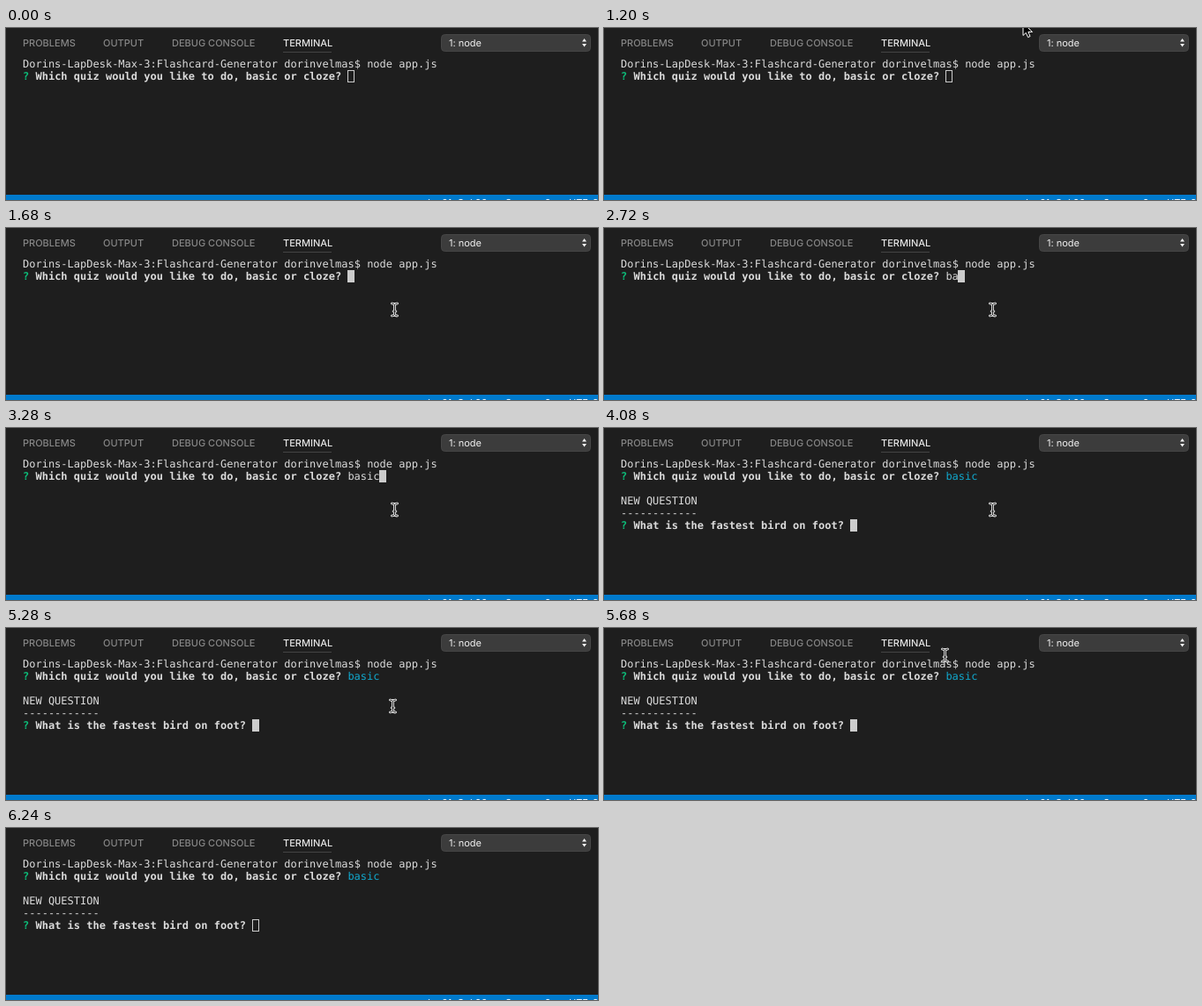
Animation of 671 by 196 pixels, one loop 6320 ms. Source, as an HTML page:

```html
<!DOCTYPE html>
<html lang="en">
<head>
<meta charset="utf-8">
<title>Terminal quiz</title>
<style>
  html, body { margin: 0; width: 100%; height: 100%; overflow: hidden; background: #1e1e1e; }
  svg { display: block; }
  text { white-space: pre; text-rendering: geometricPrecision; }
  .ui { font: 500 11px Inter, sans-serif; fill: #868686; }
  .ui .active { fill: #e7e7e7; }
  .ui .option { font-weight: 400; fill: #f0f0f0; }
  .ui .status { font-weight: 400; fill: #fff; }
  .term { font: 12px "DejaVu Sans Mono", monospace; fill: #dcdcdc; }
  .bold { font-weight: 700; }
  .green { fill: #0dbc79; }
  .cyan { fill: #11a8cd; }
</style>
</head>
<body>
<svg width="671" height="196" viewBox="0 0 671 196">
  <rect width="671" height="196" fill="#1e1e1e"/>
  <g class="ui">
    <text x="19" y="21">PROBLEMS</text>
    <text x="110" y="21">OUTPUT</text>
    <text x="188" y="21">DEBUG CONSOLE</text>
    <text x="314" y="21" class="active">TERMINAL</text>
    <rect x="314" y="27" width="55" height="1" fill="#444"/>
    <rect x="493.5" y="7.5" width="169" height="19" rx="4" fill="#3c3c3c" stroke="#464646"/>
    <text x="502" y="21" class="option">1: node</text>
    <path d="M653 15.5L655.5 12L658 15.5ZM653 18L655.5 21.5L658 18Z" fill="#f0f0f0"/>
    <rect y="190" width="671" height="6" fill="#007acc"/>
    <text x="478" y="203" class="status">Ln 61, Col 26</text>
    <text x="566" y="203" class="status">Spaces: 2</text>
    <text x="638" y="203" class="status">UTF-8</text>
  </g>
  <g class="term">
    <text x="19" y="45">Dorins-LapDesk-Max-3:Flashcard-Generator dorinvelmas$ node app.js</text>
    <text x="19" y="59" class="bold"><tspan class="green">?</tspan> Which quiz would you like to do, basic or cloze?</text>
    <text id="answer" x="387.4" y="59"></text>
    <g id="heading">
      <text x="19" y="87">NEW QUESTION</text>
      <text x="19" y="101">------------</text>
    </g>
    <text id="question" x="19" y="115" class="bold"><tspan class="green">?</tspan> What is the fastest bird on foot?</text>
  </g>
  <rect id="caret" width="7" height="13" stroke="#ccc"/>
  <g id="arrow">
    <path d="M0 0V14.5L3.3 11.4L5.6 16.6L8 15.5L5.8 10.5H10.5Z" fill="#000" stroke="#fff" stroke-linejoin="round"/>
  </g>
  <g id="beam" fill="none" stroke-linecap="round">
    <path id="beamShape" d="M-3 -7Q-.5 -7 0 -5.5Q.5 -7 3 -7M-3 7Q-.5 7 0 5.5Q.5 7 3 7M0 -5.5V5.5M-1.5 2H1.5" stroke="#e4e4e4" stroke-width="2.4"/>
    <use href="#beamShape"/>
    <path d="M-3 -7Q-.5 -7 0 -5.5Q.5 -7 3 -7M-3 7Q-.5 7 0 5.5Q.5 7 3 7M0 -5.5V5.5M-1.5 2H1.5" stroke="#1a1a1a" stroke-width=".9"/>
  </g>
</svg>
<script>
  const LOOP = 6320;
  const CELL = 7.224, LEFT = 19, TOP = 34, LINE = 14;
  const $ = id => document.getElementById(id);

  // time, pointer shape, x, y
  const pointerSteps = [
    [0, ""],
    [1200, "arrow", 475, -6],
    [1280, "beam", 466.5, 36],
    [1360, "beam", 452.5, 76],
    [1440, "beam", 444.5, 100],
    [1600, "beam", 460.5, 110],
    [1680, "beam", 440.5, 93],
    [5280, "beam", 438.5, 89],
    [5360, "beam", 432.5, 77],
    [5520, "beam", 426.5, 69],
    [5600, "beam", 409.5, 51],
    [5680, "beam", 386.5, 31],
    [5760, "arrow", 368, 10],
    [5840, ""]
  ];

  // time, typed letters, caret column, caret row
  const terminalSteps = [
    [0, 0, 51, 1],
    [2560, 1, 52, 1],
    [2720, 2, 53, 1],
    [2800, 3, 54, 1],
    [3040, 4, 55, 1],
    [3280, 5, 56, 1],
    [3920, 5, 0, 2],
    [4000, 5, 0, 5],
    [4080, 5, 36, 5]
  ];

  const stepAt = (steps, t) => steps.findLast(step => step[0] <= t);
  const show = (node, on) => node.setAttribute("visibility", on ? "visible" : "hidden");

  function draw(t) {
    const [, typed, column, row] = stepAt(terminalSteps, t);
    $("answer").textContent = "basic".slice(0, typed);
    $("answer").setAttribute("class", t >= 3920 ? "cyan" : "");
    show($("heading"), t >= 4000);
    show($("question"), t >= 4080);

    const focused = t >= 1680 && t < 6240;
    const caret = $("caret");
    caret.setAttribute("x", Math.floor(LEFT + column * CELL) + 0.5);
    caret.setAttribute("y", TOP + row * LINE + 0.5);
    caret.setAttribute("fill", focused ? "#ccc" : "none");

    const [, shape, x, y] = stepAt(pointerSteps, t);
    for (const id of ["arrow", "beam"]) show($(id), id === shape);
    if (shape) $(shape).setAttribute("transform", `translate(${x} ${y})`);
  }

  const start = performance.now();
  function tick() {
    draw((performance.now() - start) % LOOP);
    requestAnimationFrame(tick);
  }
  tick();
</script>
</body>
</html>
```
